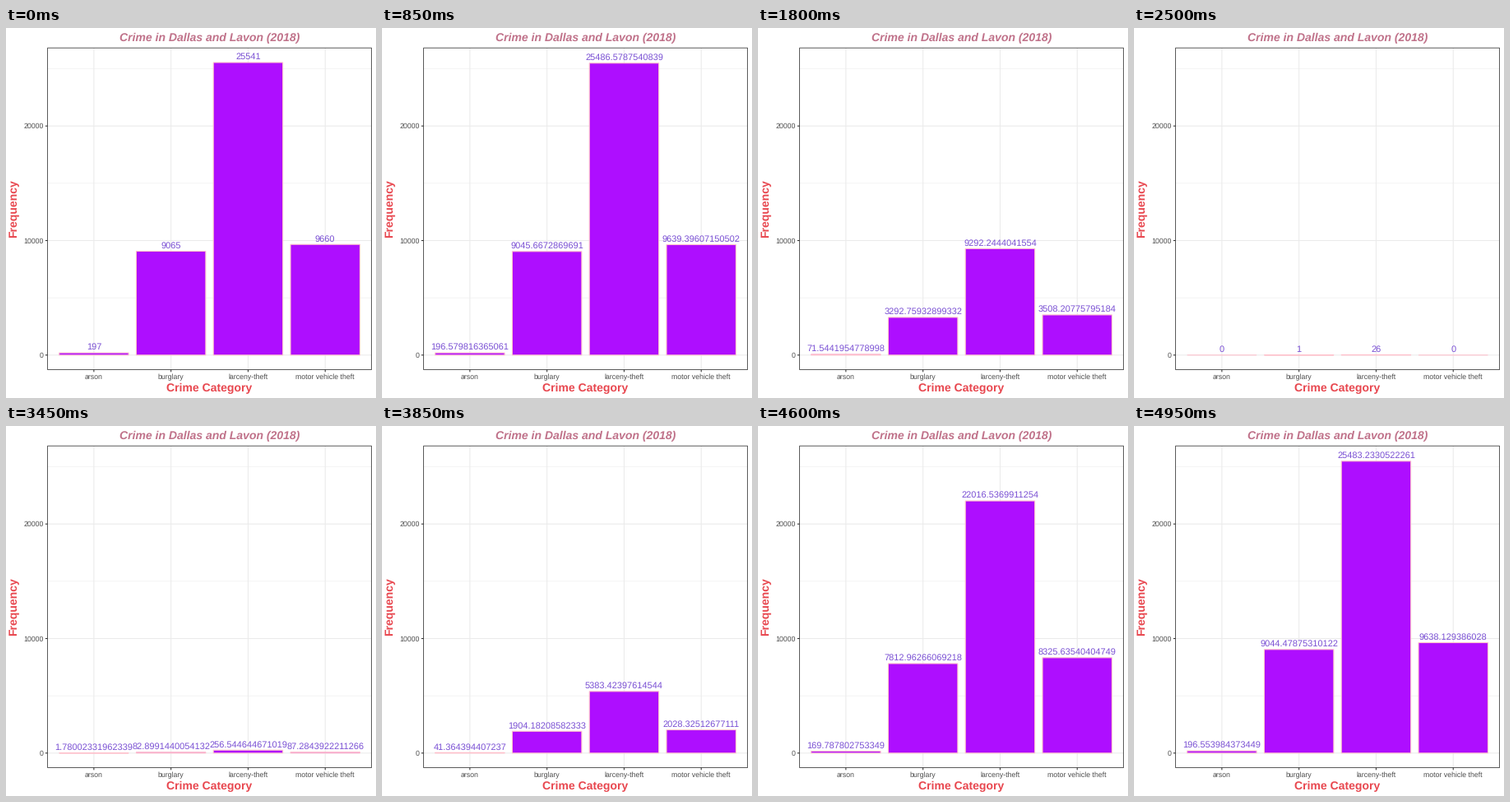
A matplotlib script for the animation above (5000 ms loop, 450x450 px).

```python
import math

import matplotlib.pyplot as plt
from matplotlib.animation import FuncAnimation
from matplotlib.patches import Rectangle

plt.rcParams["font.family"] = "Liberation Sans"
plt.rcParams["text.hinting"] = "none"

SIZE, DPI = 450, 72
FRAMES, INTERVAL = 100, 50
LEFT, RIGHT, TOP, BOTTOM = 50.6, 444.5, 24.2, 415.6

NAMES = ["arson", "burglary", "larceny-theft", "motor vehicle theft"]
HIGH = [197, 9065, 25541, 9660]
LOW = [0, 1, 26, 0]

# The axis is padded by 5% of the tallest bar at both ends.
UNIT = (BOTTOM - TOP) / (1.1 * max(HIGH))
ZERO = BOTTOM - 0.05 * max(HIGH) * UNIT
STEP = (RIGHT - LEFT) / 4.2
BAR = 0.9 * STEP
CENTERS = [LEFT + (0.6 + i) * STEP for i in range(4)]

GRID, INK, TICK_TEXT = "#ebebeb", "#333333", "#4d4d4d"
FILL, EDGE, LABEL = "#ae0eff", "#ffc0cb", "#7a50d4"
TITLE, AXIS_TITLE = "#c0728a", "#e8474f"


def y_of(value):
    return ZERO - value * UNIT


def line(xs, ys, color, width, z):
    ax.plot(xs, ys, color=color, lw=width, zorder=z, snap=False,
            solid_capstyle="butt")


def text(x, y, s, size, color, **kw):
    kw = {"ha": "center", "va": "baseline", **kw}
    return ax.text(x, y, s, fontsize=size, color=color, zorder=6, **kw)


fig = plt.figure(figsize=(SIZE / DPI, SIZE / DPI), dpi=DPI, facecolor="white")
ax = fig.add_axes([0, 0, 1, 1])
ax.set_xlim(0, SIZE)
ax.set_ylim(SIZE, 0)
ax.axis("off")

for value in (5000, 15000, 25000):
    line([LEFT, RIGHT], [y_of(value)] * 2, GRID, 0.53, 1)
for value in (0, 10000, 20000):
    y = y_of(value)
    line([LEFT, RIGHT], [y, y], GRID, 1.07, 1)
    line([LEFT - 2.75, LEFT], [y, y], INK, 1.07, 5)
    text(LEFT - 4.9, y + 3.2, str(value), 8.8, TICK_TEXT, ha="right")
for x, name in zip(CENTERS, NAMES):
    line([x, x], [TOP, BOTTOM], GRID, 1.07, 1)
    line([x, x], [BOTTOM, BOTTOM + 2.75], INK, 1.07, 5)
    text(x, 427, name, 8.8, TICK_TEXT)
ax.add_patch(Rectangle((LEFT, TOP), RIGHT - LEFT, BOTTOM - TOP, fill=False,
                       ec=INK, lw=0.8, zorder=4, snap=False))

text((LEFT + RIGHT) / 2, 16, "Crime in Dallas and Lavon (2018)", 14, TITLE,
     weight="bold", style="italic")
text((LEFT + RIGHT) / 2, 442, "Crime Category", 14, AXIS_TITLE, weight="bold")
text(16, (TOP + BOTTOM) / 2, "Frequency", 14, AXIS_TITLE, weight="bold",
     rotation=90, ha="right", va="center", rotation_mode="default")

bars, labels = [], []
for x in CENTERS:
    bar = Rectangle((x - BAR / 2, ZERO), BAR, 0, fc=FILL, ec=EDGE, lw=1.07,
                    joinstyle="miter", zorder=3, snap=False)
    bars.append(ax.add_patch(bar))
    labels.append(text(x, ZERO, "", 11.04, LABEL))


def ease(t):
    return (1 - math.cos(math.pi * t)) / 2


def values(frame):
    if frame <= 16:
        return HIGH
    if frame < 50:
        start, end, t = HIGH, LOW, (frame - 16) / 34
    elif frame <= 67:
        return LOW
    else:
        start, end, t = LOW, HIGH, (frame - 67) / 33
    p = ease(t)
    return [a + (b - a) * p for a, b in zip(start, end)]


def draw(frame):
    for bar, label, value in zip(bars, labels, values(frame)):
        bar.set_y(y_of(value))
        bar.set_height(value * UNIT)
        label.set_y(y_of(value) - 3.8)
        label.set_text(f"{value:.15g}")
    return bars + labels


anim = FuncAnimation(fig, draw, frames=FRAMES, interval=INTERVAL,
                     init_func=lambda: draw(0), repeat=True, repeat_delay=0)
plt.show()
```
